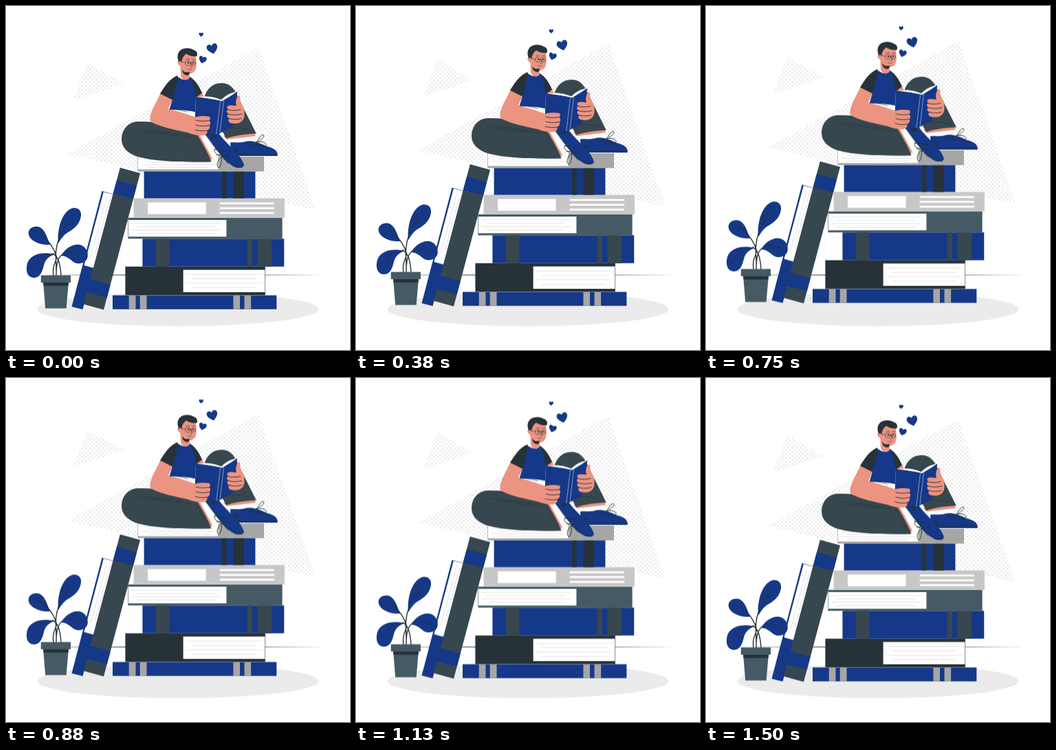
An HTML page for the animation above (1540 ms loop, 500x500 px).

```html
<!DOCTYPE html>
<html lang="en">
<head>
<meta charset="utf-8">
<title>Reading on a stack of books</title>
<style>
html, body { margin: 0; width: 100%; height: 100%; overflow: hidden; background: #fff; }
svg { display: block; width: 100vw; height: 100vh; }
.navy { fill: #153888; }
.ink { fill: #263238; }
.slate { fill: #37474f; }
.steel { fill: #455a64; }
.grey { fill: #a6a6a6; }
.light { fill: #c7c7c7; }
.white { fill: #fff; }
.skin { fill: #eb9481; }
.line { fill: none; stroke: #263238; stroke-width: .9; stroke-linecap: round; stroke-linejoin: round; }
.thin { stroke-width: .6; }
.page { fill: none; stroke: #d2d2d2; stroke-width: .6; }
</style>
</head>
<body>
<svg viewBox="0 0 500 500">
  <defs>
    <pattern id="dots" width="6.2" height="6.2" patternUnits="userSpaceOnUse">
      <g fill="#dedede"><circle cx="1.55" cy="1.55" r="1.1"/><circle cx="4.65" cy="4.65" r="1.1"/></g>
    </pattern>
    <path id="heart" d="M0 5C-3 2.6-5.2.6-5-2C-4.8-4.8-1.4-5.4 0-2.7C1.4-5.4 4.8-4.8 5-2C5.2.6 3 2.6 0 5Z"/>
  </defs>

  <ellipse cx="250" cy="440.6" rx="204.2" ry="24.8" fill="#ebebeb"/>
  <path class="ink" d="M35 391L250 390.2L466 391L250 391.7Z"/>

  <g id="scene">
    <path fill="url(#dots)" d="M367 60L450 297L90 215ZM118 83L171 113L98 137Z"/>

    <g id="leaning">
      <path class="navy" d="M139.5 269L156.5 273.5L111.5 441L95.5 437Z"/>
      <path class="white" d="M141.8 270.2L155.7 273.8L127 381L113.4 377.2Z"/>
      <path class="page" d="M146.5 277L123 365M150.5 281L129 361"/>
      <path d="M113.4 377.2L127 381" class="line thin"/>
      <path class="slate" d="M165.8 235L195 243L142 441.5L113 433.5Z"/>
      <path class="navy" d="M161 253L190 261L185 280.3L155.7 272.5ZM122.7 397L151.8 405L146.8 423.8L117.6 416Z"/>
    </g>

    <g id="stack">
      <path class="navy" d="M155 420.4H393.3V440.8H155Z"/>
      <path class="grey" d="M178.7 420.4h9.8v20.4h-9.8zM194.7 420.4h9.8v20.4h-9.8zM330.4 420.4h9.6v20.4h-9.6zM346.5 420.4h9.6v20.4h-9.6z"/>

      <path class="ink" d="M173.4 378.8H376.8V420.2H173.4Z"/>
      <path class="white" d="M257.6 383.5H376.3V416H257.6Z"/>

      <path class="navy" d="M198.4 338.2H404.2V378.8H198.4Z"/>
      <path class="slate" d="M217.5 338.2h20v40.6h-20zM350.3 338.2h7.7v40.6h-7.7zM365.5 338.2h20.5v40.6h-20.5z"/>

      <path class="steel" d="M177.4 307.8H401.6V338.3H177.4Z"/>
      <path class="white" d="M178 311H320.4V335.2H178Z"/>

      <path class="light" d="M185.5 279.5H404.9V307.8H185.5Z"/>
      <path class="white" d="M206 285.5h84.6v17.1h-84.6zM310.6 285.4h79.4v2.9h-79.4zM310.6 292.4h79.4v2.9h-79.4zM310.6 299.4h79.4v2.9h-79.4z"/>

      <path class="navy" d="M200.6 240.3H362.4V279.5H200.6Z"/>
      <path class="ink" d="M314.2 240.3h6.3v39.2h-6.3zM330.2 240.3h15.6v39.2h-15.6z"/>

      <path class="grey" d="M191.3 219H375V240.6H191.3Z"/>
      <path class="white" d="M192 219H308.5V237.4H192Z"/>
      <g id="pages" class="page"></g>
    </g>

    <g id="legs">
      <path class="white" d="M318 191L358 188L366 199L326 203Z"/>
      <path class="skin" d="M316 189L361 184L363 189L321 194Z"/>
      <path class="slate" d="M288 134C291 121 300 112 313 112C325 112 331 119 336 130L363.8 185.5C349 186 333 188 320 192.5L303 160Z"/>
      <path class="line thin" d="M322 177C333 177 344 178 352 180"/>
      <path class="navy" d="M326 198.5C333 198 340 199 346 197.5C358 194 368 199 379 204C388 206 396 210 394.6 218H327Z"/>
      <path class="line" d="M327 214.5C350 217 371 213 394 216M349 199.5L376 205M364 198C370 190 371 186 374.5 187.5C376.5 189 371 195 364 198C373 196 380 199 377.5 204C372 207 368 202 364 198M357 197L362 205"/>
      <ellipse class="ink" cx="333" cy="210.5" rx="3" ry="3.6"/>

      <path class="white" d="M277 187L290 183L306 214L299 224Z"/>
      <path class="skin" d="M273 185L282 188L300 221.5L296 225Z"/>
      <path class="slate" d="M191 168C220 167 250 173 277 185C285 199 294 213 298.5 226.5C262 227 222 227 191 219C177 214 168 206 168 194C168 180 177 169 191 168Z"/>
      <path class="line thin" d="M194 180C224 181 249 185 269 191M204 184C226 184 240 187 254 190M276 191L290 217"/>
      <path class="navy" d="M288 184C294 181 300 182 306 181C311 188 317 195 325 203C335 213 344 222 346 232C344 236 337 236 332 234C321 228 314 219 308 211Z"/>
      <path class="line" d="M290 187C305 207 318 230 343 235M303 208L324 212M306 216L326 218M314 219C307 223 305 232 309 235C313 235 313 225 314 219C305 217 301 211 304 208C309 209 312 214 314 219L323 229"/>
      <circle class="ink" cx="302" cy="188" r="3.8"/>
    </g>

    <g id="torso">
      <path class="skin" d="M225 126L243 135C239 142 237 147 236 150C248 152 260 156 273 161L283 160L297 162C298 170 295 184 288 188C279 189 272 187 264 184C246 180 225 176 212 169C207 166 210 157 214 148Z"/>
      <path class="skin" d="M276 127L284 124L288 132L278 134Z"/>
      <path class="ink" d="M249 101C237 106 230 118 224 127.5L242 136.5L255 114ZM266 102C276 108 281 117 285 126.5L276 133L267 116Z"/>
      <path class="navy" d="M251 103C255 108 263 108 268 104C272 111 275 123 276 133L275 154C262 151 249 151 237.5 150.5C242 137 246 121 251 103Z"/>
      <path class="line thin" d="M238 150C248 150 256 152 264 154"/>
    </g>

    <g id="head">
      <path class="skin" d="M253 82L254 102C257 109 264 109 267 104L266 94Z"/>
      <path class="skin" d="M254 72C260 66 273 67 276 73C277 82 278 92 273 96C267 101 258 98 255 91L253.5 87C249 86 248 80 251 79Z"/>
      <path class="ink" d="M256 92C259 97 263 97 267 95.5L266 100C263 102 259 100 257 97Z"/>
      <path class="ink" d="M251.5 82C248 74 249 68 254 64C259 60 268 60.5 272 63.5C277 65 279 68 277.5 73C272 74 266 72 262 69.5C258 72 256 76 255 82.5C254 79 252 79 251.5 82Z"/>
      <g class="line thin">
        <circle cx="264.3" cy="83" r="3.7"/>
        <circle cx="272.4" cy="83.2" r="3"/>
        <path d="M254 81L260.6 82.4M268 82.4H269.4M262 77.8C264 76.5 266 76.8 267 77.6M270.5 78C272 77 274 77.3 275 78.2M269.4 83.5L270.2 88L268 88.4M264 91.4C266 93.2 268.5 92.6 270 91"/>
      </g>
      <circle class="ink" cx="265" cy="82.5" r="1.2"/><circle class="ink" cx="272" cy="82.7" r="1.1"/>
    </g>

    <g id="reading">
      <path class="white" d="M278 134C290 129 304 132 313 138C318 130 326 126 335 125L331 140L310 148Z"/>
      <path class="navy" d="M276 132L313 137L336.3 124.5L329 175L306.5 187.5L274 180Z"/>
      <path class="white" d="M278.5 132.3C291 131 303 132 313 136.3C319 130 326 126.5 334 125.2C327 131 321 134 314 138.2C302 135.5 291 133 278.5 132.3Z"/>
      <path fill="none" stroke="#dfe5f2" stroke-width=".7" stroke-dasharray="3 .7" d="M311.5 139L305.8 186M316.5 137.5L311 184"/>
      <path class="skin" d="M274 162C281 159 290 160 295 160.5C298 162 297 166 294 167C298 167 298 172 295 174C298 176 295 180 292 181C294 184 291 188 286 188C279 188.5 274 186 269 183Z"/>
      <path class="line" d="M276 166C283 168 289 167.5 294 166.5M276 173C283 175 290 175 295 173.5M275 180C282 182 287 182 292 181"/>
      <path class="skin" d="M335 145C333 139 335 132 338 130C341 130 341 135 340 140C344 143 347 149 346.5 157C347 164 343 169 337 170.5C331 171 325 171 324 168C322 166 324 164 326 163.5C321 163 320 158 324 157C320 155 320 151 324 150.5C320 149 321 145 325 144.6C329 144 332 145 335 145Z"/>
      <path class="line" d="M323 150.8C329 152.5 335 152 341 150.5M323 157C330 159 337 158.5 343 157M325 163.7C331 165.5 337 165 342 163.5"/>
    </g>

    <g id="hearts" class="navy">
      <use href="#heart" transform="translate(283.7 41.6) scale(.64)"/>
      <use href="#heart" transform="translate(300 62) rotate(-15) scale(1.55)"/>
      <use href="#heart" transform="translate(285.7 78) rotate(16) scale(1.1)"/>
    </g>

    <g id="plant">
      <g class="navy">
        <path d="M76 345C74 325 81 299 96 294C104 292 110 297 109 305C107 320 95 326 87 331C82 335 79 340 76 345Z"/>
        <path d="M64 347C49 348 34 341 32.7 331C32 322 43 318 50 322C58 327 60 338 64 347Z"/>
        <path d="M70 361C56 357 36 359 31 374C28 385 31 395 41 395C50 395 53 385 55 377C57 368 63 364 70 361Z"/>
        <path d="M80 363C85 354 96 345 107 347C116 349 121 359 118 367C114 375 104 376 98 372C92 367 87 363 80 363Z"/>
      </g>
      <path class="line" style="stroke-width:1.4" d="M69 392C66 374 75 372 73 363C70 353 62 342 55 335M73 392C74 373 69 358 77 338M80 392C79 375 75 363 68 360M73 392C73 375 75 366 82 361"/>
      <path class="line thin" d="M77 338C83 323 92 312 101 301M83 326V314M88 319L89 308M86 321L97 315M55 335C50 332 45 330 40 329M51 332V326M52 333L44 335M68 360C56 361 45 368 38 382M52 365L44 365M46 370L47 379M82 361C90 357 100 357 112 362M93 358L99 352M98 358L105 366"/>
      <path class="steel" d="M54 400H91L87.7 439.5H57.2Z"/>
      <path class="ink" d="M54 401.5H91L90.6 406.8H54.6Z"/>
      <path class="steel" d="M50.8 391.5H94V402H50.8Z"/>
    </g>
  </g>
</svg>
<script>
// Page edges: left, right, first line, spacing, count
const pageBlocks = [
  [262, 372, 390, 6.4, 4],
  [182, 312, 316, 4.8, 4],
  [197, 304, 223.5, 3.6, 4]
];
document.getElementById('pages').innerHTML = pageBlocks.map(([x1, x2, y, gap, n]) =>
  Array.from({ length: n }, (_, i) => {
    const inset = (i % 2) * 8;
    return `<path d="M${x1 + inset} ${y + i * gap}H${x2 - inset}"/>`;
  }).join('')
).join('');

// Linear float up and back, shown at 24 pictures per second
const loop = 1540;
const lift = (ms, y) => ({ offset: ms / loop, transform: `translateY(${y}px)` });
document.getElementById('scene').animate(
  [lift(0, 0), lift(725, -9.6), lift(1500, .2), lift(loop, .2)],
  { duration: loop, iterations: Infinity, delay: -4, easing: 'steps(37)' }
);
</script>
</body>
</html>
```
